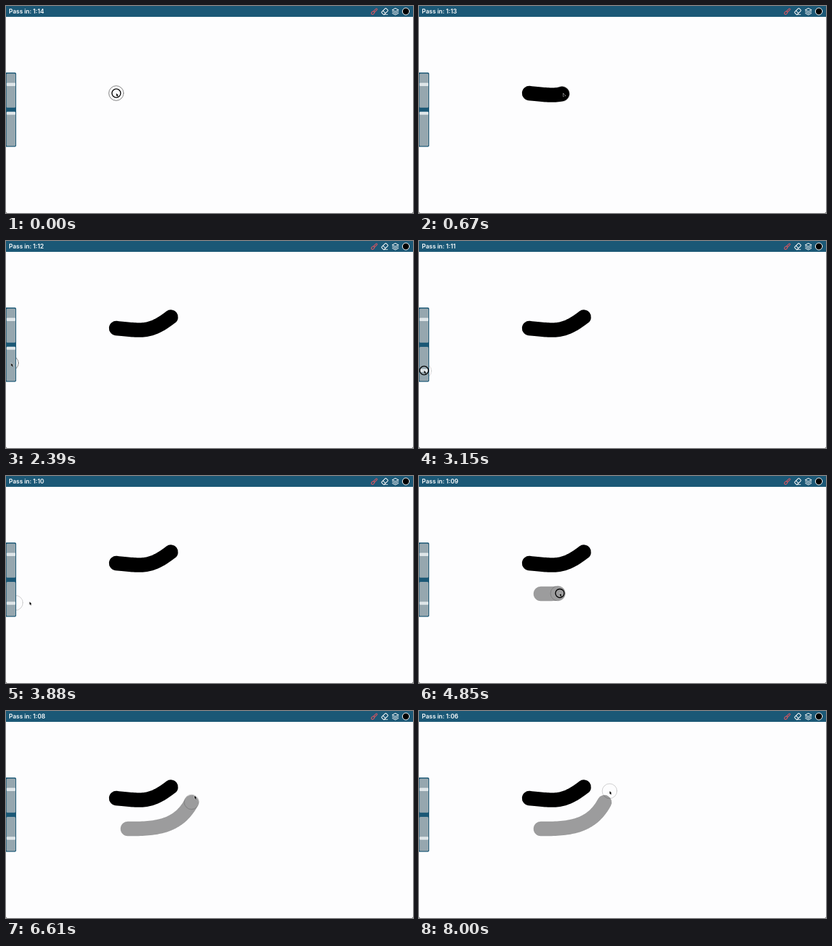
Write an HTML page with a canvas that moves like this. It is 600 by 305 pixels and loops after 8060 ms.

```html
<!DOCTYPE html>
<html lang="en">
<head>
<meta charset="utf-8">
<title>Drawing pad</title>
<style>
html, body { margin: 0; width: 100%; height: 100%; overflow: hidden; background: #fdfdfe; }
canvas { display: block; }
</style>
</head>
<body>
<canvas id="stage" width="600" height="305"></canvas>
<script>
const ctx = document.getElementById('stage').getContext('2d');
const LOOP = 8060, LAG = 30;
const BLUE = '#1b5876', PAPER = '#fdfdfe', RED = '#df5660', WHITE = '#fff';

const linear = k => k;
const easeOut = k => 1 - (1 - k) ** 3;
const clamp = k => Math.min(1, Math.max(0, k));

// Pointer stops, and the Bézier moves that join them
const A = [162.5, 128.5], B = [243, 112], C = [47, 167], D = [7.5, 180];
const E = [7.5, 187.5], F = [179.5, 173.5], G = [273.4, 134.5], H = [281, 118];
const move = (start, end, ease, ...points) => ({ start, end, ease, points });
const press = (start, end, release, ...points) => ({ ...move(start, end, linear, ...points), release });

const first = press(0, 1100, 1180, A, [200, 132], [212, 136], B);
const slide = press(2520, 3250, 3350, D, [7.5, 202], E);
const second = press(4570, 5770, 6120, F, [222, 174], [254, 170.5], G);
const presses = [first, slide, second];
const moves = [
  first,
  move(1291, 1566, easeOut, B, [145, 168], C),
  move(1640, 2390, easeOut, C, D),
  slide,
  move(3842, 4542, easeOut, E, F),
  second,
  move(6580, 6700, easeOut, G, H)
];

function bezier(points, k) {
  if (points.length === 1) return points[0];
  const inner = points.slice(1).map((p, i) => p.map((v, j) => points[i][j] * (1 - k) + v * k));
  return bezier(inner, k);
}

function pointer(t) {
  const m = moves.findLast(m => m.start <= t) || first;
  return bezier(m.points, m.ease(clamp((t - m.start) / (m.end - m.start))));
}

const sliderY = t => t < slide.start ? 158 : pointer(Math.min(t, slide.release))[1];
const ink = (t, strength = 1) => `rgba(0,0,0,${(1 - (sliderY(t) - 158) / 48) * strength})`;

function line(points, color, width = 1) {
  ctx.beginPath();
  points.forEach(p => ctx.lineTo(...p));
  ctx.strokeStyle = color;
  ctx.lineWidth = width;
  ctx.stroke();
}

// Filled unless a line width is given
function shape(color, width, trace) {
  ctx.beginPath();
  trace();
  ctx.strokeStyle = ctx.fillStyle = color;
  ctx.lineWidth = width;
  if (width) ctx.stroke(); else ctx.fill();
}
const circle = (x, y, r, color, width) => shape(color, width, () => ctx.arc(x, y, r, 0, 7));
const box = (x, y, w, h, r, color, width) => shape(color, width, () => ctx.roundRect(x, y, w, h, r));

function place(x, y, angle, paint) {
  ctx.save();
  ctx.translate(x, y);
  ctx.rotate(angle);
  paint();
  ctx.restore();
}

function brushStroke({ start, release }, t) {
  const last = Math.min(t - LAG, release);
  if (last <= start) return;
  const points = [];
  for (let s = start; s < last; s += 30) points.push(pointer(s));
  points.push(pointer(last));
  line(points, ink(start), 21.4);
}

function header(t) {
  box(0, 0, 600, 16, 0, BLUE);
  const seconds = 14 - Math.floor((t + 360) / 1000);
  ctx.fillStyle = WHITE;
  ctx.font = '600 8.9px Inter, sans-serif';
  ctx.fillText(`Pass in: 1:${String(seconds).padStart(2, '0')}`, 4.3, 11.2);

  // Brush
  place(543, 8, -Math.PI / 4, () => {
    box(-0.5, -1.1, 6, 2.2, 1, RED, 1);
    shape(RED, 1, () => ctx.ellipse(-3, 0, 2.5, 1.8, 0, 0, 7));
  });

  // Eraser
  place(558.4, 8, -Math.PI / 4, () => {
    box(-4.6, -2.6, 9.2, 5.2, 1, WHITE, 1);
    line([[-1.2, -2.6], [-1.2, 2.6]], WHITE);
  });
  line([[557, 12.6], [562.5, 12.6]], WHITE, 0.8);

  // Layers
  line([[569.5, 5.8], [574, 3.3], [578.5, 5.8]], WHITE);
  for (let y = 5.8; y < 11; y += 2.4) line([[569.5, y], [574, y + 2.4], [578.5, y]], WHITE);

  circle(589.5, 8, 5, '#000');
  circle(589.5, 8, 5.1, WHITE, 1);
}

function panel(t) {
  box(0, 98, 15, 109.5, [0, 2, 2, 0], BLUE);
  for (const [top, handle] of [[99.6, 115.6], [156, sliderY(t)]]) {
    box(0.7, top, 13.3, 50.2, 1.5, '#96a7af');
    box(0.9, handle - 2.3, 12.9, 4.6, 1, '#dfe6e9');
  }
}

function cursor(x, y) {
  place(x, y, 0, () => {
    const arrow = [[0, 0], [0, 4.4], [1.2, 3.4], [3.2, 3.2], [0, 0]];
    const tail = [[1, 2.5], [2, 4.8]];
    line(arrow, WHITE, 0.8);
    line(tail, '#000', 0.9);
    shape('#000', 0, () => arrow.forEach(p => ctx.lineTo(...p)));
  });
}

function corners() {
  for (const [x, dx] of [[0, 2], [600, -2]]) {
    shape('#444', 0, () => {
      ctx.moveTo(x, 303);
      ctx.quadraticCurveTo(x, 305, x + dx, 305);
      ctx.lineTo(x, 305);
    });
  }
}

function draw() {
  const t = performance.now() % LOOP;
  const [x, y] = pointer(t);
  ctx.lineCap = ctx.lineJoin = 'round';
  box(0, 0, 600, 305, 0, PAPER);
  brushStroke(first, t);
  brushStroke(second, t);
  circle(...pointer(t - LAG), 10.9, ink(t, 0.7), 0.7);
  header(t);
  panel(t);
  corners();
  for (const { start, release } of presses) {
    const fade = t < start ? 0 : clamp(1 - (t - release) / 60);
    if (fade) circle(x, y, 6.4, `rgba(0,0,0,${fade})`, 1.4);
  }
  cursor(x, y);
  requestAnimationFrame(draw);
}
draw();
</script>
</body>
</html>
```
